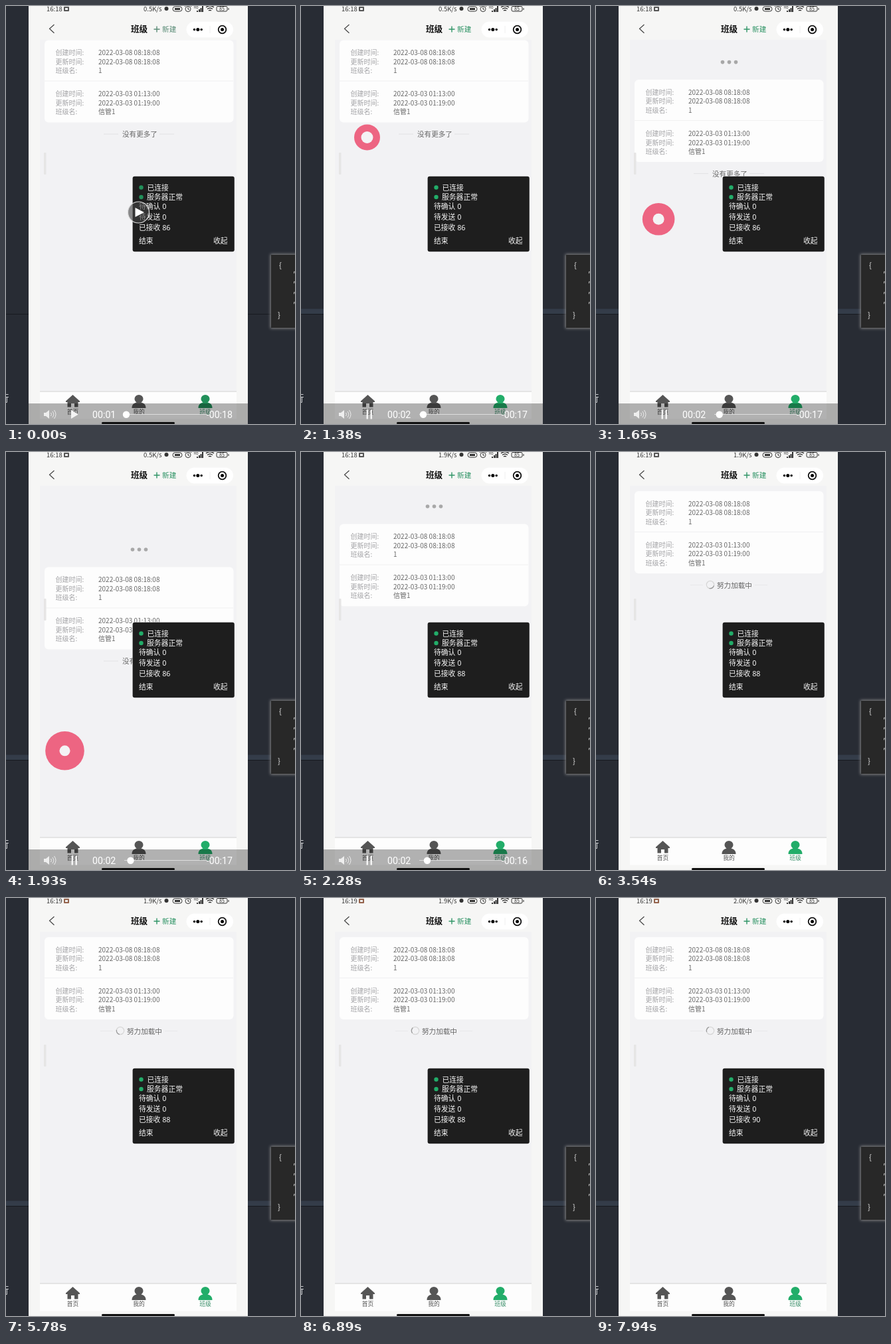
Animation of 435 by 630 pixels, one loop 8000 ms. Source, as an HTML page:

```html
<!DOCTYPE html>
<html lang="zh-CN">
<head>
<meta charset="utf-8">
<title>班级</title>
<style>
html, body { margin: 0; width: 100%; height: 100%; overflow: hidden; background: #282c34; }
svg { display: block; width: 435px; height: 630px; font-family: "Noto Sans CJK SC", "Noto Sans CJK", "Noto Sans", sans-serif; }
text { white-space: pre; }
#panel { font: 500 10.8px "Noto Sans", "Noto Sans CJK SC", "Noto Sans CJK", sans-serif; }
.clock { font: 14.2px Roboto, "Liberation Sans", sans-serif; fill: #fff; }
</style>
</head>
<body>
<svg id="stage" viewBox="0 0 435 630">
  <defs>
    <clipPath id="page"><rect x="51" y="51" width="296" height="530"/></clipPath>
    <filter id="glow" x="-20%" y="-20%" width="140%" height="140%"><feGaussianBlur stdDeviation="2"/></filter>
    <path id="person" d="M-10.500 10.500C-10.500 5-7.500 3-3.500 2C-6 0-6.500-2-6.500-3.500A6.500 6 0 0 1 6.500-3.500C6.500-2 6 0 3.500 2C7.500 3 10.500 5 10.500 10.500Z"/>
  </defs>
  <rect width="435" height="630" fill="#282c34"/>
  <rect id="band" y="456.500" width="435" height="7.500" fill="#343c49"/>
  <path d="M0 464.500H435" stroke="#171a20"/>
  <text x="-9" y="596" font-size="13.500" fill="#d5d7da">行</text>

  <rect x="398" y="374" width="50" height="112" fill="#888" filter="url(#glow)"/>
  <rect x="399" y="375" width="50" height="110" fill="#282828"/>
  <g id="code" fill="#ddd" font-size="11.500"></g>

  <rect x="34" width="330" height="630" fill="#f6f6f5"/>
  <rect x="51" y="51" width="296" height="530" fill="#f2f2f4"/>
  <g clip-path="url(#page)">
    <g id="list">
      <g fill="#a8a8a8"><circle cx="190.500" cy="25" r="2.800"/><circle cx="200.500" cy="25" r="2.800"/><circle cx="210.500" cy="25" r="2.800"/></g>
      <rect x="58" y="51.500" width="284.500" height="124" rx="6" fill="#fdfdfd"/>
      <path d="M58 113H342" stroke="#f0f0f1"/>
      <g id="rows" font-size="10"></g>
      <g id="end">
        <path d="M147 193H169M231 193H253" stroke="#e2e2e4"/>
        <text x="175" y="197" font-size="10.600" fill="#666">没有更多了</text>
      </g>
      <g id="loading">
        <path d="M142 193H161M239 193H258" stroke="#e8e8ea"/>
        <circle cx="172" cy="192.500" r="5.700" fill="none" stroke="#d6d6d6" stroke-width="1.200"/>
        <path id="spin" d="M166.300 192.500A5.700 5.700 0 0 1 172 186.800" fill="none" stroke="#9a9a9a" stroke-width="1.300"/>
        <text x="182" y="197" font-size="10.600" fill="#666">努力加载中</text>
      </g>
    </g>
    <rect x="57" y="221" width="3.500" height="33" rx="1" fill="#e6e5e5"/>
  </g>

  <g font-size="9.500" fill="#333">
    <text id="time" x="61" y="8"></text>
    <g id="rec"><rect x="87" y="1" width="8" height="7" rx="1"/><rect x="89" y="3" width="4" height="3" fill="#eee"/></g>
    <text id="speed" x="234.500" y="8" text-anchor="end"></text>
    <circle cx="241.500" cy="4" r="3"/>
    <g fill="none" stroke="#333">
      <rect x="251" y="1" width="14" height="7" rx="3.500"/><path d="M254 4.500H262" stroke-width="3"/>
      <circle cx="274" cy="4.500" r="4"/><path d="M274 2V5H276M270 0L269 1M278 0L279 1"/>
      <path d="M301 2Q307-2.500 313 2M303 4.500Q307 1.500 311 4.500M305 7Q307 5.500 309 7" stroke-width="1.400"/>
      <rect x="317" y=".5" width="16" height="7.500" rx="2"/><path d="M335 3V6"/>
    </g>
    <path d="M287 9V7H289V9ZM290 9V5H292V9ZM292.500 9V3H294.500V9ZM295 9V0H297V9Z"/>
    <text x="282.500" y="4" font-size="5">HD</text>
    <text x="321" y="7" font-size="7">85</text>
  </g>

  <path d="M72.500 28L65.500 34.300L72.500 40.700" fill="none" stroke="#444" stroke-width="1.200"/>
  <text x="188" y="39.300" font-size="12.600" font-weight="700" fill="#111">班级</text>
  <g id="add">
    <path d="M222.500 35H231.500M227 30.500V39.500" stroke="currentColor" stroke-width="1.400"/>
    <text x="235" y="39" font-size="10.700" fill="currentColor">新建</text>
  </g>
  <rect x="271.500" y="23.500" width="70.500" height="24" rx="12" fill="#fff"/>
  <path d="M307 30V41" stroke="#eee"/>
  <circle cx="283.500" cy="35.500" r="1.700"/><circle cx="288.800" cy="35.500" r="2.500"/><circle cx="294.200" cy="35.500" r="1.700"/>
  <circle cx="325.500" cy="35.500" r="5.800" fill="none" stroke="#111" stroke-width="1.800"/><circle cx="325.500" cy="35.500" r="2.500"/>

  <rect x="51" y="581" width="296" height="41.500" fill="#fdfdfd"/>
  <path d="M51 581H347" stroke="#d0d0d0"/>
  <g font-size="8.800" text-anchor="middle" fill="#555">
    <path d="M90 595.500L100.500 586L111 595.500V597H108.500V604.500H103V599H98V604.500H92.500V597H90Z"/>
    <text x="100.500" y="615">首页</text>
    <use href="#person" x="200" y="595.500"/><text x="200" y="615">我的</text>
    <use class="green" href="#person" x="300" y="595.500"/><text x="300" y="615" fill="#3a8f6a">班级</text>
  </g>

  <g id="touch"><circle id="ring" fill="#ed6582"/><circle id="hole" fill="#f4f3f5"/></g>

  <rect x="190" y="256" width="154.500" height="115" rx="4" fill="#fff" opacity=".5"/>
  <rect x="190.600" y="256.800" width="153.200" height="113.500" rx="3" fill="#1e1e1e"/>
  <g class="green"><circle cx="203.500" cy="273.500" r="3.200"/><circle cx="203.500" cy="288" r="3.200"/></g>
  <g id="panel" fill="#f6f6f6"></g>

  <g id="bar">
    <rect x="34" y="599" width="330" height="31" fill-opacity=".3"/>
    <path d="M57 613H60L65 609V622L60 618H57Z" fill="#eee"/>
    <path d="M67.500 613Q69.500 615.500 67.500 618M70 611Q73.500 615.500 70 620M72.500 609Q77.500 615.500 72.500 622" fill="none" stroke="#eee"/>
    <path id="start" d="M98 609L109 615.500L98 622Z" fill="#f4f4f4"/>
    <path id="pause" d="M98.500 608.500H101V622.500H98.500ZM104.500 608.500H107V622.500H104.500Z" fill="#f4f4f4"/>
    <text id="gone" class="clock" x="130" y="620.500"></text>
    <path d="M178 615.500H302" stroke="#ddd" stroke-width="1.200"/>
    <circle id="knob" cy="615.800" r="5.200" fill="#fff"/>
    <text id="left" class="clock" x="341" y="620.500" text-anchor="end"></text>
  </g>
  <rect x="144" y="627" width="110" height="3" rx="1.500" fill="#111"/>
  <g id="play">
    <circle cx="199.500" cy="311" r="16" fill="#444" fill-opacity=".6" stroke="#ddd" stroke-width="1.200"/>
    <path d="M194.500 304L208 311L194.500 318Z" fill="#fff"/>
  </g>
</svg>
<script>
const LOOP = 8000;
const $ = id => document.getElementById(id);
const NS = 'http://www.w3.org/2000/svg';

function label(parent, x, y, str, attrs = {}) {
  const el = document.createElementNS(NS, 'text');
  Object.entries({ x, y, ...attrs }).forEach(([k, v]) => el.setAttribute(k, v));
  el.textContent = str;
  $(parent).append(el);
  return el;
}

const names = ['创建时间:', '更新时间:', '班级名:'];
const classes = [
  ['2022-03-08 08:18:08', '2022-03-08 08:18:08', '1'],
  ['2022-03-03 01:13:00', '2022-03-03 01:19:00', '信管1']
];
classes.forEach((values, i) => values.forEach((value, j) => {
  const y = 74.2 + i * 62.2 + j * 13.5;
  label('rows', 74.5, y, names[j], { fill: '#a3a3a6' });
  label('rows', 139, y, value, { fill: '#666' });
}));

label('panel', 212.5, 277.5, '已连接');
label('panel', 212, 292, '服务器正常');
label('panel', 200, 306.3, '待确认 0');
label('panel', 200, 322, '待发送 0');
const received = label('panel', 200, 337.8, '');
label('panel', 200, 358.3, '结束');
label('panel', 312, 358.3, '收起');

label('code', 411, 395, '{');
for (let i = 0; i < 4; i++) label('code', 430, 410 + i * 15.3, '"', { 'font-style': 'italic' });
label('code', 409, 470, '}');

const clamp = v => Math.max(0, Math.min(1, v));
const ramp = (t, a, b) => clamp((t - a) / (b - a));
const smooth = p => p * p * (3 - 2 * p);
const easeOut = p => 1 - (1 - p) ** 3;
const mix = (a, b, p) => a + (b - a) * p;
// Value of the last [time, value] pair already reached
const step = (t, pairs) => pairs.filter(p => t >= p[0]).pop()[1];
// Straight lines through [time, value] pairs
const track = (t, pts) => pts.slice(1).reduce(
  (v, [time, value], i) => v + (value - pts[i][1]) * ramp(t, pts[i][0], time), pts[0][1]);

const set = (id, attrs) => Object.entries(attrs).forEach(([k, v]) => $(id).setAttribute(k, v));
const show = (id, on) => $(id).setAttribute('visibility', on ? 'visible' : 'hidden');
const write = (el, str) => { if (el.textContent !== str) el.textContent = str; };

function draw(t) {
  const drag = smooth(ramp(t, 1390, 1920));
  const offset = 122 * drag
    - 65 * easeOut(ramp(t, 1970, 2250))
    - 49.5 * easeOut(ramp(t, 2340, 2560));
  set('list', { transform: `translate(0 ${offset.toFixed(2)})` });
  show('end', t < 2120);
  show('loading', t >= 2450);
  set('spin', { transform: `rotate(${(t * .36) % 360} 172 192.5)` });

  set('touch', { opacity: ramp(t, 1220, 1300) * (1 - ramp(t, 1950, 2090)) });
  const cx = mix(99.5, 88.5, drag), cy = mix(198, 450.3, drag);
  const press = easeOut(ramp(t, 1220, 1380));
  set('ring', { cx, cy, r: mix(10, 19.5, press) + 9.8 * drag });
  set('hole', { cx, cy, r: 9 - drag });

  const fresh = t >= 950;
  show('band', fresh);
  document.querySelectorAll('.green').forEach(g => g.setAttribute('fill', fresh ? '#22ad69' : '#21905a'));
  set('add', { color: fresh ? '#2f9466' : '#598b76' });

  write($('time'), t < 3000 ? '16:18' : '16:19');
  set('rec', { fill: t < 4300 ? '#555' : '#94634c' });
  write($('speed'), step(t, [[0, '0.5K/s'], [2150, '1.9K/s'], [7000, '2.0K/s']]));
  write(received, '已接收 ' + step(t, [[0, 86], [2150, 88], [7000, 90]]));

  const playing = t >= 200;
  const controls = t < 3500;
  set('play', { opacity: 1 - ramp(t, 130, 330) });
  show('bar', controls);
  show('start', controls && !playing);
  show('pause', controls && playing);
  write($('gone'), '00:0' + step(t, [[0, 1], [1250, 2], [2350, 3]]));
  write($('left'), '-00:' + step(t, [[0, 18], [1150, 17], [2150, 16], [3150, 15]]));
  set('knob', { cx: track(t, [[0, 181], [900, 181], [1380, 184], [1930, 187.5], [3500, 198.5]]) });
}

const begin = performance.now();
function tick() {
  draw((performance.now() - begin) % LOOP);
  requestAnimationFrame(tick);
}
tick();
</script>
</body>
</html>
```
